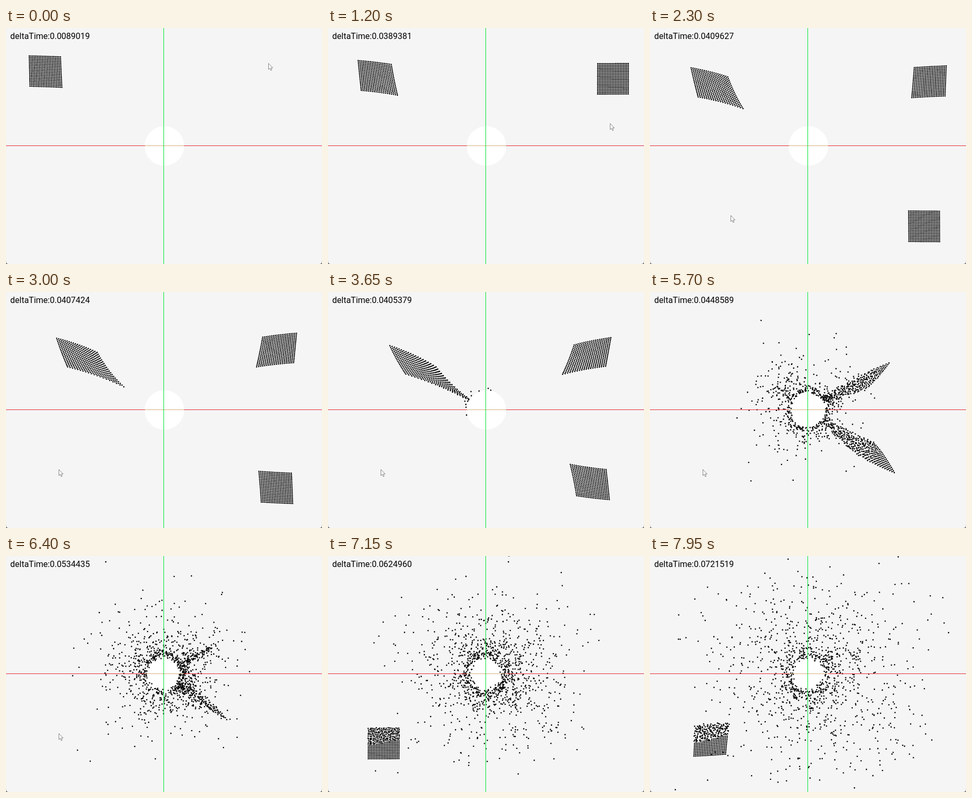
Write an HTML page with a canvas that moves like this. It is 600 px wide and 450 px high and loops after 8000 ms.

```html
<!DOCTYPE html>
<html>
<head>
<meta charset="utf-8">
<style>
  html, body { margin: 0; width: 100%; height: 100%; overflow: hidden; background: #f5f5f5; }
  canvas { display: block; }
</style>
</head>
<body>
<canvas id="stage" width="600" height="450"></canvas>
<script>
const ctx = document.getElementById('stage').getContext('2d');
const LOOP = 8, STEP = 0.05;
const CX = 300, CY = 224.5, CORE = 38, GRAVITY = 1.15e6;
const SIDE = 20, SPACING = 3.05;

// Square swarms: centre, release time and pace of the fall.
const swarms = [
  { x: 69, y: 79.5, start: -1.19, pace: .78 },
  { x: 541.5, y: 96.7, start: .95, pace: .93 },
  { x: 521.7, y: 379, start: 1.9, pace: 1.05 },
  { x: 105, y: 358, start: 6.85, pace: 1, ruffled: true }
];

// Key points: [time, x, y] and [time, reading].
const cursorPath = [[0, 498, 67], [.9, 541, 97], [1.9, 522, 379], [2.3, 153, 357], [2.6, 100, 338]];
const readings = [[0, .0089019], [.05, .0368214], [2.3, .0409627], [3.65, .0405379],
  [4.4, .0378503], [5.7, .0448589], [6.4, .0534435], [7.95, .0721519]];

const clamp = v => Math.max(0, Math.min(1, v));

function lookup(keys, t, column = 1) {
  const next = Math.max(1, keys.findIndex(k => k[0] >= t));
  const q = t >= keys.at(-1)[0] ? keys.at(-1) : keys[next];
  const p = keys[keys.indexOf(q) - 1];
  return p[column] + (q[column] - p[column]) * clamp((t - p[0]) / (q[0] - p[0]));
}

let seed = 20;
function random() {
  seed = seed + 0x6D2B79F5 | 0;
  let h = Math.imul(seed ^ seed >>> 15, 1 | seed);
  h = h + Math.imul(h ^ h >>> 7, 61 | h) ^ h;
  return ((h ^ h >>> 14) >>> 0) / 4294967296;
}
const bell = () => (random() + random() + random() - 1.5) / 1.5;

// Radial free fall from rest at apex under inverse-square gravity.
const fallScale = apex => Math.sqrt(apex ** 3 / (2 * GRAVITY));

function fallTime(apex) {
  const x = CORE / apex;
  return fallScale(apex) * (Math.acos(Math.sqrt(x)) + Math.sqrt(x * (1 - x)));
}

function fallRadius(apex, time) {
  const u = Math.abs(time) / fallScale(apex);
  let eta = u / 2;
  for (let i = 0; i < 7; i++) {
    const c = Math.cos(eta);
    eta += (u - eta - Math.sin(eta) * c) / (2 * c * c);
  }
  return apex * Math.cos(eta) ** 2;
}

// Bounces off the core; they get wilder as the crowd grows.
function makeHops(start, angle) {
  const hops = [];
  while (start < LOOP) {
    const energy = 1.5 + 3.3 * Math.max(0, start - 3.4);
    const apex = Math.min(900, CORE + .3 + energy * (-Math.log(1 - random())) ** 2.4);
    const half = fallTime(apex);
    const turn = bell() * (hops.length ? 1.8 : 5);
    hops.push({ start, half, apex, angle, turn });
    start += 2 * half;
    angle += turn;
  }
  return hops;
}

function makeParticle(swarm, col, row) {
  const mid = (SIDE - 1) / 2;
  const dx = swarm.x + (col - mid) * SPACING - CX;
  const dy = swarm.y + (row - mid) * SPACING - CY;
  const apex = Math.hypot(dx, dy), angle = Math.atan2(dy, dx);
  const impact = swarm.start + fallTime(apex) / swarm.pace;
  return {
    swarm, apex, angle, impact,
    ruffle: swarm.ruffled && row < 11 - col * .2 ? 5 : 0,
    jitterX: bell(), jitterY: bell(), depth: 11 * random(),
    hops: makeHops(impact, angle)
  };
}

const particles = [];
for (const swarm of swarms)
  for (let i = 0; i < SIDE * SIDE; i++)
    particles.push(makeParticle(swarm, i % SIDE, Math.floor(i / SIDE)));

function place(p, t) {
  let r, angle, shake = 0;
  if (t < p.impact) {
    const age = t - p.swarm.start;
    r = fallRadius(p.apex, age * p.swarm.pace);
    angle = p.angle;
    shake = p.ruffle * clamp(age) + 7 * clamp((170 - r) / 110) * clamp((t - 3.8) / 1.5);
  } else {
    const hop = p.hops.findLast(h => h.start <= t);
    const age = t - hop.start;
    r = fallRadius(hop.apex, age - hop.half) - p.depth * clamp((t - 4.2) / 2.5);
    angle = hop.angle + hop.turn * age / (2 * hop.half);
  }
  return [CX + r * Math.cos(angle) + p.jitterX * shake, CY + r * Math.sin(angle) + p.jitterY * shake];
}

function drawCursor(x, y) {
  ctx.save();
  ctx.translate(x, y);
  ctx.fillStyle = '#fff';
  ctx.strokeStyle = '#666';
  ctx.lineWidth = .8;
  const arrow = new Path2D('M.5 .5V12L3 9.7L5 14L6.7 13.2L4.9 9H8.5Z');
  ctx.fill(arrow);
  ctx.stroke(arrow);
  ctx.restore();
}

function drawCorner(x, side) {
  ctx.beginPath();
  ctx.moveTo(x, 444);
  ctx.quadraticCurveTo(x, 450, x + 6 * side, 450);
  ctx.lineTo(x, 450);
  ctx.fill();
}

function rect(color, x, y, w, h) {
  ctx.fillStyle = color;
  ctx.fillRect(x, y, w, h);
}

function draw(t) {
  rect('#f5f5f5', 0, 0, 600, 450);
  ctx.fillStyle = '#fff';
  ctx.beginPath();
  ctx.arc(300.7, 224.8, 37.6, 0, 7);
  ctx.fill();

  drawCursor(lookup(cursorPath, t), lookup(cursorPath, t, 2));

  ctx.fillStyle = '#000';
  ctx.beginPath();
  for (const p of particles) {
    if (t < p.swarm.start) continue;
    const [x, y] = place(p, t);
    ctx.moveTo(x + 1.3, y);
    ctx.arc(x, y, 1.3, 0, 7);
  }
  ctx.fill();

  rect('#e62937', 0, 224, 600, 1);
  rect('#d3b083', 264, 224, 74, 1);
  rect('#00e430', 299, 0, 1, 450);

  ctx.fillStyle = '#000';
  ctx.font = '16px Roboto, sans-serif';
  ctx.fillText('deltaTime:' + lookup(readings, t).toFixed(7), 8, 21);

  ctx.fillStyle = '#777';
  drawCorner(0, 1);
  drawCorner(600, -1);
}

function frame() {
  const t = performance.now() / 1000 % LOOP;
  draw(Math.floor(t / STEP + 1e-6) * STEP);
  requestAnimationFrame(frame);
}
frame();
</script>
</body>
</html>
```
